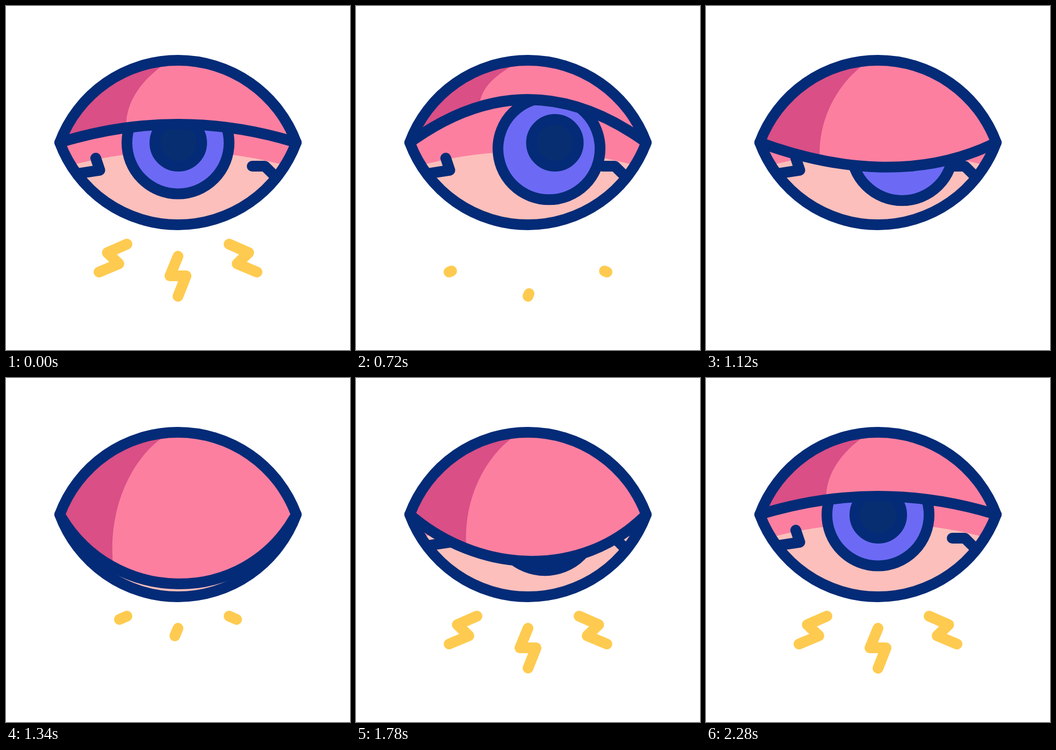
An HTML page that plays this animation: 640x640 px, repeating every 2.4 s.

```html
<!DOCTYPE html>
<html lang="en">
<head>
<meta charset="utf-8">
<title>Sore eye</title>
<style>
  html, body { margin: 0; width: 100%; height: 100%; overflow: hidden; background: #fff; }
  svg { display: block; width: 100%; height: 100%; }
  .line { fill: none; stroke: #042b77; stroke-width: 20; stroke-linecap: round; stroke-linejoin: round; }
  .bolt { stroke: #fecb50; }
</style>
</head>
<body>
<svg viewBox="0 0 640 640">
  <defs>
    <clipPath id="eyeClip"><path d="M100 254A234.7 234.7 0 0 1 540 254A234.7 234.7 0 0 1 100 254Z"/></clipPath>
    <clipPath id="lidClip"><path id="lidShape"/></clipPath>
  </defs>
  <g clip-path="url(#eyeClip)">
    <rect x="90" y="90" width="460" height="330" fill="#fc7fa0"/>
    <path d="M100 302.2A776 776 0 0 1 540 302.2V420H100Z" fill="#fcbfbb"/>
    <path class="line" d="M167 283L174.5 305.5L130 312.3M458 298H481.5L505 321"/>
    <circle id="iris" class="line" cy="254.5" r="95" style="fill:#6c6af4"/>
    <circle id="pupil" class="line" cy="254.5" r="43.5" style="fill:#082e72"/>
    <g clip-path="url(#lidClip)">
      <rect x="90" y="90" width="460" height="330" fill="#fc7fa0"/>
      <path id="shade" fill="#d94f86"/>
    </g>
  </g>
  <path id="lidEdge" class="line"/>
  <path class="line" d="M100 254A234.7 234.7 0 0 1 540 254A234.7 234.7 0 0 1 100 254Z"/>
  <path class="line bolt" pathLength="1" d="M225 443L188.5 459L210 479.5L173 495"/>
  <path class="line bolt" pathLength="1" d="M320 465.5L305 502H335L320 540"/>
  <path class="line bolt" pathLength="1" d="M415 443L451.5 459L430 479.5L467 495"/>
</svg>
<script>
const LOOP = 2400;
const el = id => document.getElementById(id);
const bolts = document.querySelectorAll('.bolt');
const ramp = (t, a, b) => Math.min(1, Math.max(0, (t - a) / (b - a)));
const ease = (t, a, b) => { const u = ramp(t, a, b); return u * u * (3 - 2 * u); };

// The lid edge joins the eye corners; sag is its depth below them,
// skew moves the deepest point to the right.
function drawLid(sag, skew) {
  const dx = 146.7 - 0.00303 * Math.max(sag, 0) ** 2;
  const dy = 254 + sag * 4 / 3;
  const edge = `M100 254C${100 + dx} ${dy - skew} ${540 - dx} ${dy + skew} 540 254`;
  el('lidEdge').setAttribute('d', edge);
  el('lidShape').setAttribute('d', edge + 'V80H100Z');

  const x = 218.5 - 0.157 * sag;
  const y = 243.5 + sag * (1 - ((320 - x) / 220) ** 2);
  const w = 291 - x, h = y - 111;
  el('shade').setAttribute('d',
    `M291 111C${291 - (0.44 + 0.0009 * h) * w} ${111 + (0.3 - 0.0005 * h) * h} ` +
    `${x + 1 - 0.05 * sag} ${111 + 0.59 * h} ${x} ${y}V420H90V90H291Z`);
}

function drawBolts(t) {
  const start = t < 1000 ? ease(t, 200, 800) : 0;
  const end = t < 1000 ? 1 : ease(t, 1200, 1800);
  const len = end - start;
  for (const b of bolts) {
    b.style.visibility = len > 0.0005 ? 'visible' : 'hidden';
    b.style.strokeDasharray = `${len} 2`;
    b.style.strokeDashoffset = -start;
  }
}

function frame() {
  const t = performance.now() % LOOP;
  const look = ramp(t, 200, 800) - ramp(t, 1600, 2200);
  el('iris').setAttribute('cx', 320 + 45 * look);
  el('iris').setAttribute('cy', 254.5 + 12.5 * look);
  el('pupil').setAttribute('cx', 320.5 + 57 * look);

  const wide = ease(t, 200, 700) - ease(t, 700, 1500);
  const shut = ease(t, 700, 1500) - ease(t, 1500, 2200);
  drawLid(-34 - 46.5 * wide + 187 * shut, 36 * shut * (1 - shut));
  drawBolts(t);
  requestAnimationFrame(frame);
}
frame();
</script>
</body>
</html>
```
